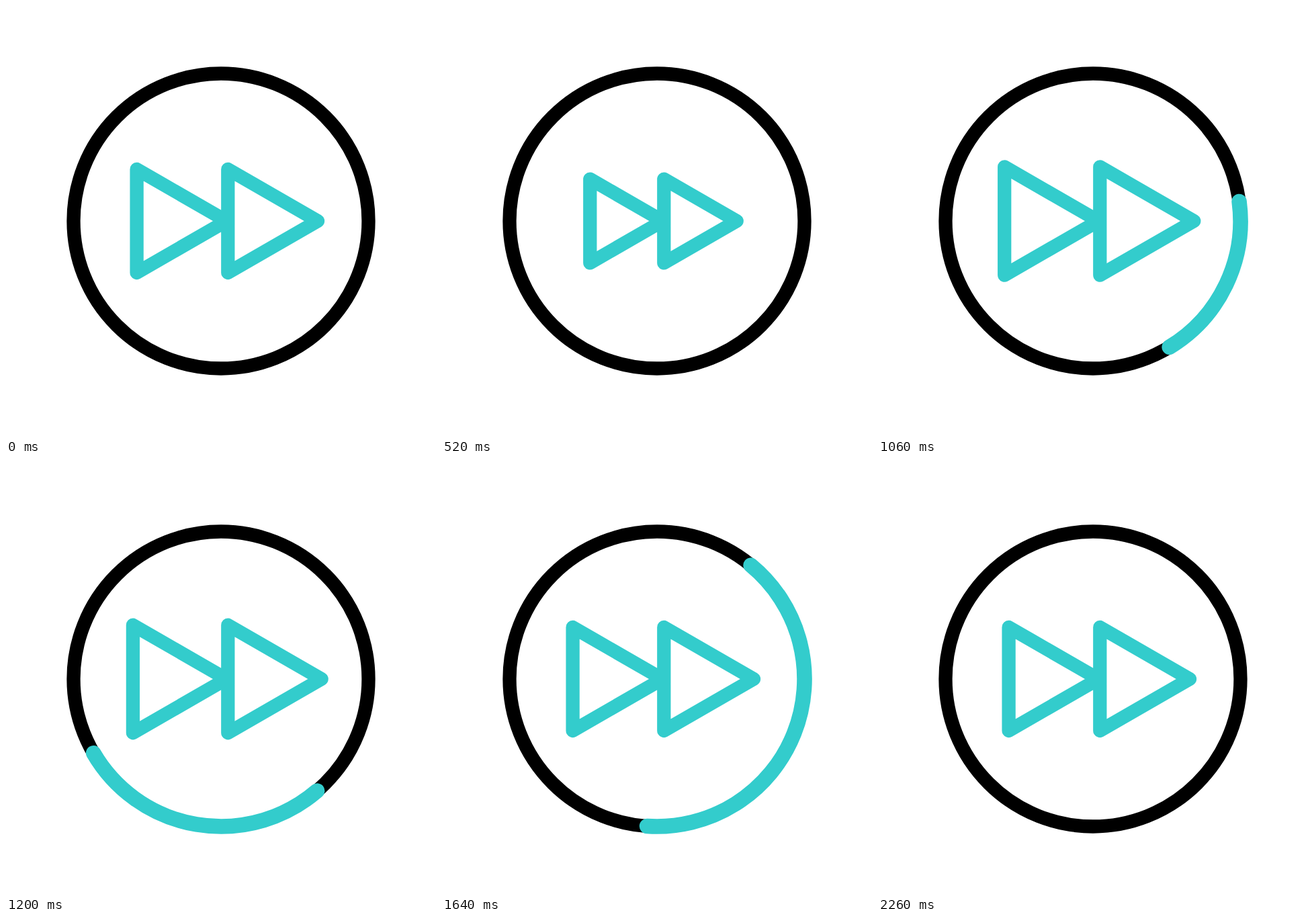
An HTML page for the animation above (2720 ms loop, 640 by 640 pixels).

```html
<!DOCTYPE html>
<html lang="en">
<head>
<meta charset="utf-8">
<title>Fast forward</title>
<style>
  html, body { margin: 0; width: 100%; height: 100%; overflow: hidden; background: #fff; }
  svg { display: block; width: 100%; height: 100%; fill: none; stroke: #3cc; stroke-linecap: round; stroke-linejoin: round; }
</style>
</head>
<body>
<svg viewBox="0 0 640 640">
  <circle cx="320" cy="320" r="219.5" stroke="#000" stroke-width="20.3"/>
  <path id="arc" stroke-width="22.6"/>
  <path id="arrows" stroke-width="20.3"/>
</svg>
<script>
const LOOP = 2720, STEP = 20, CENTER = 320, RADIUS = 219.5, PIVOT = 330.3;

// Steps are [time in ms, value]; angles run clockwise from the top.
const SCALE = [[0, 1], [540, 0.81], [1080, 1.048], [1620, 1]];
const HEAD = [[610, 0], [1060, 148.8], [1360, 355.5], [1640, 543.9], [1960, 686], [2260, 720]];
const TAIL = [[610, 0], [1060, 82.4], [1360, 220.7], [1640, 399.5], [1960, 633.9], [2260, 720]];

const arc = document.getElementById('arc');
const arrows = document.getElementById('arrows');

const slope = (a, b) => (b[1] - a[1]) / (b[0] - a[0]);

// Speed at a step: zero at both ends and at turning points.
function speed(steps, i) {
  const [a, b, c] = [steps[i - 1], steps[i], steps[i + 1]];
  if (!a || !c) return 0;
  const s = slope(a, b), n = slope(b, c);
  if (s * n <= 0) return 0;
  return (s * (c[0] - b[0]) + n * (b[0] - a[0])) / (c[0] - a[0]);
}

// Smooth cubic through the steps.
function valueAt(steps, t) {
  const last = steps.length - 1;
  if (t <= steps[0][0]) return steps[0][1];
  if (t >= steps[last][0]) return steps[last][1];
  const i = steps.findIndex(s => s[0] > t) - 1;
  const [t0, v0] = steps[i], [t1, v1] = steps[i + 1];
  const d = t1 - t0, u = (t - t0) / d, w = 1 - u;
  return v0 * w * w * (1 + 2 * u) + v1 * u * u * (3 - 2 * u)
    + d * u * w * (w * speed(steps, i) - u * speed(steps, i + 1));
}

function onRing(deg) {
  const a = deg * Math.PI / 180;
  return `${CENTER + RADIUS * Math.sin(a)} ${CENTER - RADIUS * Math.cos(a)}`;
}

function triangle(base, tip, half) {
  return `M${base} ${CENTER - half}L${tip} ${CENTER}L${base} ${CENTER + half}Z`;
}

function draw(t) {
  const k = valueAt(SCALE, t);
  arrows.setAttribute('d',
    triangle(PIVOT - 135.7 * k, PIVOT - 2 * k, 77 * k) +
    triangle(PIVOT, PIVOT + 133.7 * k, 77 * k));

  const head = valueAt(HEAD, t), tail = valueAt(TAIL, t), span = head - tail;
  arc.setAttribute('d', span > 0.01
    ? `M${onRing(tail)}A${RADIUS} ${RADIUS} 0 ${span > 180 ? 1 : 0} 1 ${onRing(head)}`
    : '');
}

const start = performance.now();
function tick() {
  const t = Math.max(0, performance.now() - start) % LOOP;
  draw(t - t % STEP);
  requestAnimationFrame(tick);
}
tick();
</script>
</body>
</html>
```
